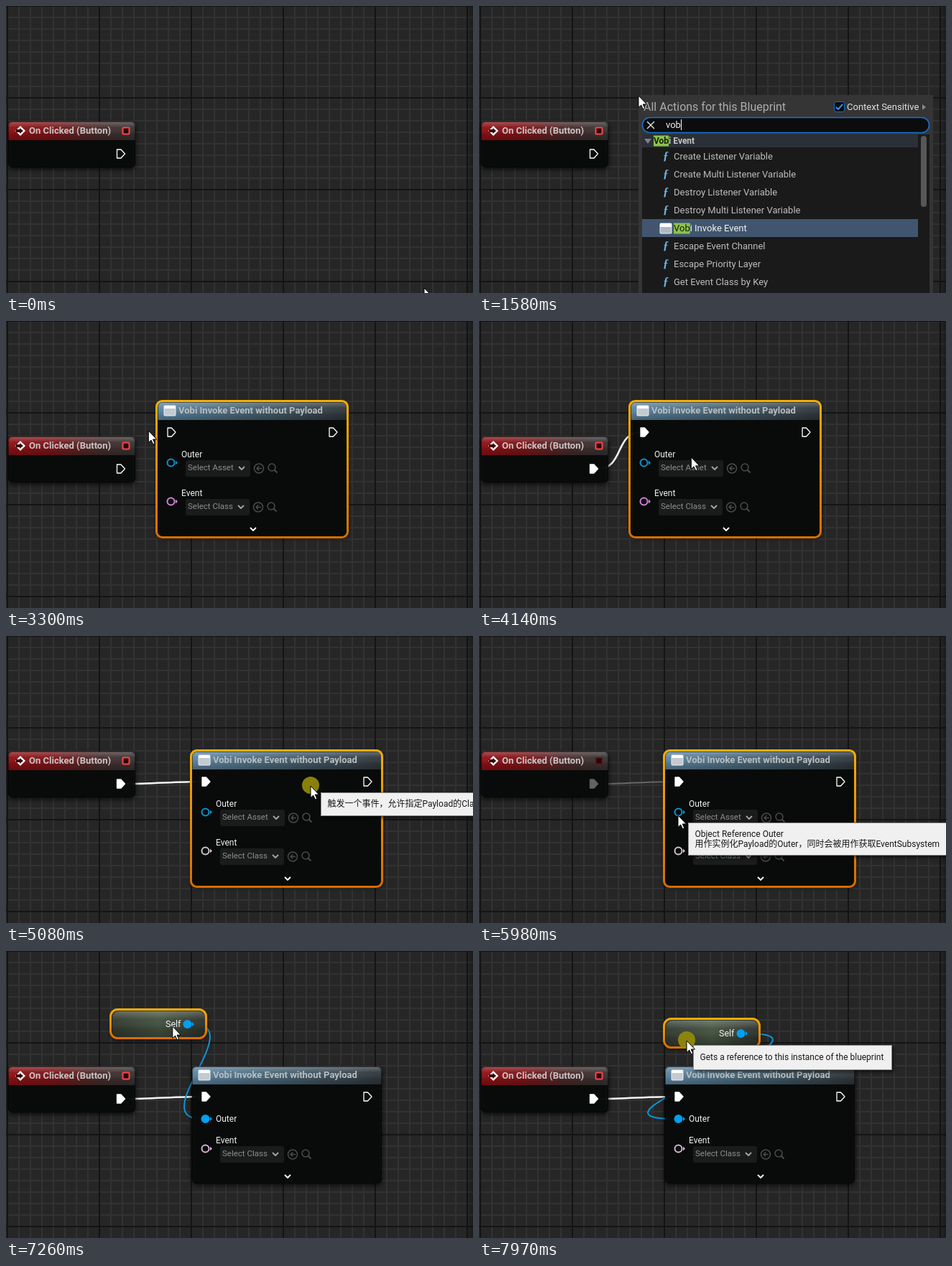
An HTML page with a canvas for the animation above (8000 ms loop, 650 by 400 pixels).

```html
<!DOCTYPE html>
<html lang="en">
<head>
<meta charset="utf-8">
<title>Node graph</title>
<style>
html, body { margin: 0; width: 100%; height: 100%; overflow: hidden; background: #262626; }
canvas { display: block; }
</style>
</head>
<body>
<canvas id="stage" width="650" height="400"></canvas>
<script>
const c = document.getElementById('stage').getContext('2d');
const LOOP = 8000;
const FONT = 'Roboto, "Noto Sans CJK SC", "Noto Sans CJK", sans-serif';
const BLUE = '#0c93d6';

// Pointer path: time, x, y
const PATH = [
  [40, 582, 393], [360, 222, 125], [2840, 222, 125], [2960, 236, 98], [3630, 162, 206],
  [3680, 157, 208], [3840, 226, 164], [4010, 226, 164], [4140, 295, 190], [4400, 376, 155],
  [4450, 376, 155], [4780, 423, 213], [5030, 423, 213], [5080, 424, 209], [5240, 424, 209],
  [5500, 350, 130], [5800, 277, 250], [6060, 277, 250], [6400, 264, 101], [7150, 264, 101],
  [7450, 177, 112], [7550, 177, 112], [7720, 228, 112], [7860, 289, 125]
];
const PRESSES = [[360, 530], [3680, 4010], [4450, 5240], [6060, 6400], [7550, 8000]];
const CATEGORIES = ['Add Event', 'Animation', 'Audio', 'Camera', 'Collision', 'Components',
  'Development', 'Game', 'Input', 'Math', 'Rendering'];
const ACTIONS = ['Create Listener Variable', 'Create Multi Listener Variable',
  'Destroy Listener Variable', 'Destroy Multi Listener Variable', 'Vobi Invoke Event',
  'Escape Event Channel', 'Escape Priority Layer', 'Get Event Class by Key'];
const CASTS = ['PolyvuntaCommonTessellationOptions', 'EditorUtilityInputKeySelector',
  'InputKeySelector', 'InterchangeBaseLightFactoryNode', 'InterchangeBaseLightNode',
  'MaterialExpressionInverseLinearInterpolate', 'TavundaBaselineController',
  'TavundaBaselineController_Basic', 'TavundaPerfBaselineActor'].map(s => 'Cast To ' + s);

const within = (t, a, b) => t >= a && t < b;
const snap = v => Math.round(v / 16) * 16;

function pointerAt(t) {
  let a = PATH[0];
  if (t <= a[0]) return { x: a[1], y: a[2] };
  for (const b of PATH) {
    if (t < b[0]) {
      const k = (t - a[0]) / (b[0] - a[0]);
      return { x: a[1] + (b[1] - a[1]) * k, y: a[2] + (b[2] - a[2]) * k };
    }
    a = b;
  }
  return { x: a[1], y: a[2] };
}

function typed(t, steps) {
  let s = '';
  for (const [at, value] of steps) if (t >= at) s = value;
  return s;
}

// Drawing helpers
function text(s, x, y, size, color, weight = 400) {
  c.font = `${weight} ${size}px ${FONT}`;
  c.textBaseline = 'middle';
  c.fillStyle = color;
  c.fillText(s, x, y);
  return c.measureText(s).width;
}
function rect(x, y, w, h, color) {
  c.fillStyle = color;
  c.fillRect(x, y, w, h);
}
function round(x, y, w, h, r, fill, stroke, width = 1) {
  c.beginPath();
  c.roundRect(x, y, w, h, r);
  if (fill) { c.fillStyle = fill; c.fill(); }
  if (stroke) { c.strokeStyle = stroke; c.lineWidth = width; c.stroke(); }
}
function poly(x, y, pts, fill, stroke, width = 1.5) {
  c.beginPath();
  for (let i = 0; i < pts.length; i += 2) c.lineTo(x + pts[i], y + pts[i + 1]);
  if (fill) { c.closePath(); c.fillStyle = fill; c.fill(); }
  if (stroke) { c.lineJoin = 'round'; c.strokeStyle = stroke; c.lineWidth = width; c.stroke(); }
}
function ring(x, y, r, fill, stroke, width = 1.5) {
  c.beginPath();
  c.arc(x, y, r, 0, 7);
  if (fill) { c.fillStyle = fill; c.fill(); }
  if (stroke) { c.strokeStyle = stroke; c.lineWidth = width; c.stroke(); }
}
function ramp(x0, y0, x1, y1, ...colors) {
  const g = c.createLinearGradient(x0, y0, x1, y1);
  colors.forEach((k, i) => g.addColorStop(i / (colors.length - 1), k));
  return g;
}

function grid() {
  rect(0, 0, 650, 400, '#262626');
  for (let x = 2; x < 650; x += 16) rect(x - 1, 0, 2, 400, '#323232');
  for (let y = 0; y < 400; y += 16) rect(0, y - 1, 650, 2, '#323232');
  for (let x = 2; x < 650; x += 128) rect(x - 1, 0, 2, 400, '#141414');
  for (let y = 0; y < 400; y += 128) rect(0, y - 1, 650, 2, '#141414');
  rect(640, 0, 10, 400, ramp(640, 0, 650, 0, 'rgba(0,0,0,0)', 'rgba(0,0,0,.3)'));
}

function wire(x0, y0, x1, y1, color, width) {
  const dx = x1 - x0, dy = Math.abs(y1 - y0);
  const k = dx < 20 ? Math.abs(dx) + dy / 2 : (dx + dy) / 3;
  c.beginPath();
  c.moveTo(x0, y0);
  c.bezierCurveTo(x0 + k, y0, x1 - k, y1, x1, y1);
  c.strokeStyle = color;
  c.lineWidth = width;
  c.stroke();
}

function execPin(x, y, full, color = '#fff') {
  poly(x, y, [-5, -6, 0.5, -6, 6, 0, 0.5, 6, -5, 6, -5, -6], full ? color : '#0b0d0c', color, 1.3);
}
function dataPin(x, y, color, full) {
  ring(x, y, 5, full ? color : '#0a0c0b', color, 2);
  poly(x, y, [6.5, -3, 9.5, 0, 6.5, 3], color);
}
const chevron = (x, y, color) => poly(x, y, [-4, -2, 0, 2, 4, -2], null, color, 1.8);

function box(x, y, w, h, r, hue, headH) {
  c.save();
  c.shadowColor = '#000';
  c.shadowBlur = 7;
  c.shadowOffsetY = 2;
  round(x, y, w, h, r, 'rgba(9,12,10,.85)');
  c.restore();
  c.save();
  c.beginPath();
  c.roundRect(x, y, w, h, r);
  c.clip();
  rect(x, y, w, headH, ramp(x, y, x + w, y, ...hue));
  rect(x, y, w, headH, ramp(x, y, x, y + headH, 'rgba(255,255,255,.28)',
    'rgba(255,255,255,.04)', 'rgba(0,0,0,.1)', 'rgba(0,0,0,.25)'));
  c.restore();
  round(x + .5, y + .5, w - 1, h - 1, r, null, 'rgba(0,0,0,.5)');
}
function outline(x, y, w, h, r) {
  round(x + 1.5, y + 1.5, w - 3, h - 3, r, null, ramp(0, y, 0, y + h, '#f7ae00', '#d76c00'), 3);
}

function clickNode(linked, dim) {
  box(3, 161, 177, 64, 6, ['#8f1015', '#7c1418', '#4a2a2a', '#343434'], 26);
  poly(20, 174, [-7, 0, 0, -7, 7, 0, 0, 7, -7, 0], '#fff');
  poly(20, 174, [-6, -2, -1, -2, -1, -4, 4, 0, -1, 4, -1, 2, -6, 2], '#35090b');
  text('On Clicked (Button)', 32, 174, 13, '#c9c4c4', 700);
  round(162.5, 169.5, 9, 9, 1, '#2a0506', dim ? '#5e1a1c' : '#ff4648', 2);
  execPin(159.5, 206, linked, dim ? '#626262' : '#fff');
}

function picker(x, y, label, w) {
  round(x + 42, y, w, 23, 3, '#1a1c1b');
  text(label, x + 45, y + 11, 11.5, '#8d8d8d');
  chevron(x + 42 + w - 12, y + 11, '#a5a5a5');
  const ix = x + 54 + w;
  ring(ix, y + 11.5, 6.5, null, '#4b4b4b');
  poly(ix, y + 11.5, [4, 0, -3, 0, 0, -3, -3, 0, 0, 3], null, '#4b4b4b');
  ring(ix + 18, y + 10, 5, null, '#4b4b4b');
  poly(ix + 21.5, y + 13.5, [0, 0, 4, 4], null, '#4b4b4b', 2);
}

function invokeNode(x, y, o) {
  const up = o.outer ? 24 : 0;
  box(x + 3, y + 3, 264, 187 - up, 6, o.fresh ? ['#686868', '#4c4c4c', '#303030']
    : ['#5d86a4', '#45606f', '#30363a'], 25);
  if (o.selected) outline(x, y, 269, 193, 8);
  round(x + 12, y + 8, 16, 14, 1, '#c3cad0');
  rect(x + 12, y + 8, 16, 4, '#fff');
  round(x + 12, y + 8, 16, 14, 1, null, '#eee');
  text('Vobi Invoke Event without Payload', x + 32, y + 15, 13, '#b8bdc0', 700);
  execPin(x + 22, y + 45, o.linked);
  execPin(x + 247, y + 45);
  text('Outer', x + 36, y + 76, 12, '#f0f0f0');
  dataPin(x + 21.5, y + (o.outer ? 76 : 87.5), o.outer ? '#00a0f0' : BLUE, o.outer);
  if (!o.outer) picker(x, y + 84, 'Select Asset', 90);
  text('Event', x + 36, y + 130 - up, 12, '#f0f0f0');
  dataPin(x + 21.5, y + 141.5 - up, o.pin);
  picker(x, y + 138 - up, 'Select Class', 89);
  chevron(x + 136, y + 180 - up, '#fff');
}

function selfNode(x, y) {
  box(x + 2, y + 2, 131, 38, 10, ['#32382f', '#42523f', '#2c302b'], 38);
  outline(x - 1, y - 1, 136, 43, 10);
  text('Self', x + 77, y + 21, 12.5, '#f2f2f2');
  dataPin(x + 107.5, y + 21, '#00a0f0', true);
}

// Text with the searched words marked
function marked(s, x, y, size, color, query, weight) {
  const words = query.trim().split(' ').join('|');
  const parts = words ? s.split(new RegExp(`(${words})`, 'i')) : [s];
  c.font = `${weight || 400} ${size}px ${FONT}`;
  parts.forEach((p, i) => {
    const w = c.measureText(p).width;
    if (i % 2) rect(x, y - 7.5, w, 15, '#8bc34a');
    text(p, x, y, size, i % 2 ? '#14200a' : color, weight);
    x += w;
  });
}

function rowIcon(kind, x, y) {
  if (kind == 'window') {
    round(x - 8, y - 7, 16, 14, 1, '#aeb9c4', '#eee');
    rect(x - 8, y - 7, 16, 5, '#fff');
  } else if (kind == 'cast') {
    poly(x - 1, y, [-8, -4, -4, 0, -8, 4], '#fff');
    rect(x - 4, y - 1.5, 2, 3, '#fff');
    rect(x - 1, y - 1.5, 5, 3, '#fff');
    poly(x + 1, y, [2, -4, 7, 0, 2, 4], '#fff');
  } else {
    c.font = 'italic 700 16px "Liberation Serif", serif';
    c.fillStyle = '#6cb4e6';
    c.fillText('ƒ', x - 4, y);
  }
}

function menu(x, y, m) {
  rect(x, y, 410, 400, '#353535');
  if (m.title) text(m.title, x + 7, m.titleY, 16, '#adadad');
  else ring(x + 12, m.titleY, 5, '#00a0f0');
  round(x + 272.5, m.titleY - 7.5, 14, 14, 3, '#0c0c0c', '#1770d2');
  poly(x + 279, m.titleY, [-4, 0, -1, 3, 5, -4], null, '#2a93ff', 2);
  text('Context Sensitive', x + 290, m.titleY, 13, '#e0e0e0');
  poly(x + 398, m.titleY, [-3, -4, 2, 0, -3, 4], '#8a8a8a');

  const sy = m.searchY;
  round(x + 5.5, sy - 10.5, 399, 21, 10.5, '#0c0c0c', '#1672d6', 1.5);
  let caretX = x + 33;
  if (m.query) {
    poly(x + 17, sy, [-5, -5, 5, 5], null, '#ddd');
    poly(x + 17, sy, [5, -5, -5, 5], null, '#ddd');
    caretX = x + 38 + text(m.query, x + 38, sy, 13, '#f0f0f0');
  } else {
    ring(x + 16, sy - 1, 4, null, '#aaa');
    poly(x + 19, sy + 2, [0, 0, 4, 4], null, '#aaa');
  }
  if (m.caret) rect(Math.round(caretX), sy - 8, 1, 15, '#fff');

  c.save();
  c.beginPath();
  c.rect(x + 5, m.listY, 400, 400);
  c.clip();
  rect(x + 5, m.listY, 400, 400, '#1a1a1a');
  const long = !m.query || m.rows.length > 1;
  const rowW = long ? 384 : 400;
  const header = (s, cy, open) => {
    rect(x + 5, cy - 9, rowW, 18, '#2b3038');
    poly(x + 13, cy, open ? [-5, -3, 5, -3, 0, 4] : [-3, -5, 4, 0, -3, 5], '#808080');
    marked(s, x + 21, cy, 12, '#c4c4c4', m.query, 700);
  };
  if (!m.query) {
    CATEGORIES.forEach((s, i) => header(s, m.listY + 9 + i * 20));
  } else {
    if (m.category) header(m.category, m.listY + 9, true);
    m.rows.forEach((s, i) => {
      const cy = m.rowY + 25 * i, on = s == m.pick;
      if (on) rect(x + 5, cy - 13, rowW, 25, '#41566e');
      rowIcon(m.icon || (on ? m.pickIcon : ''), x + (m.icon ? 48 : 38), cy);
      marked(s, x + m.indent, cy, 13, on ? '#f0f0f0' : '#bdbdbd', m.query);
    });
  }
  if (long) round(x + 393, m.listY + 2, 8, 99, 4, '#575757');
  c.restore();
}

function tooltip(x, y, w, h, lines) {
  c.save();
  c.shadowColor = 'rgba(0,0,0,.7)';
  c.shadowBlur = 5;
  c.shadowOffsetX = c.shadowOffsetY = 2;
  rect(x, y, w, h, '#f0f0f0');
  c.restore();
  c.strokeStyle = '#8c8c8c';
  c.lineWidth = 1;
  c.strokeRect(x + .5, y + .5, w - 1, h - 1);
  lines.forEach((s, i) => text(s, x + 9.5, y + h / 2 + (i - (lines.length - 1) / 2) * 14, 12, '#181818'));
}
const hint = (x, y) => tooltip(x, y, 270, 33, ['触发一个事件，允许指定Payload的Class']);

function arrow(x, y) {
  poly(x, y, [0, 0, 0, 16.5, 3.7, 13, 6.4, 18.8, 8.8, 17.7, 6.2, 12, 11.5, 12, 0, 0], '#fff', '#000', 1);
}
function moveCursor(x, y) {
  const arm = [1, -1, 1, -6, 4, -6, 0, -10, -4, -6, -1, -6, -1, -1];
  const pts = [];
  for (let k = 0; k < 4; k++) {
    for (let i = 12; i >= 0; i -= 2) {
      let px = arm[i], py = arm[i + 1];
      for (let n = 0; n < k; n++) [px, py] = [-py, px];
      pts.push(px, py);
    }
  }
  poly(x, y, pts.concat(pts.slice(0, 2)), '#fff', '#000', 1);
}

function draw(t) {
  const p = pointerAt(t);
  const linked = t >= 4010;
  const dim = within(t, 5800, 7000);
  const outer = t >= 7000;

  let nx = 208, ny = 110;
  if (t >= 4450) {
    const q = t < 5240 ? p : pointerAt(5240);
    nx += snap(q.x - 376);
    ny += snap(q.y - 155);
  }
  let sx = 145, sy = 81;
  if (t >= 7550) {
    sx += snap(p.x - 177);
    sy += p.y > 119 ? 13 : 0;
  }

  grid();
  if (linked) wire(165, 206, nx + 18, ny + 45, dim ? '#676767' : '#f4f4f4', dim ? 2 : 2.6);
  else if (t >= 3680) wire(165, 206, p.x, p.y, '#f4f4f4', 2.6);
  if (within(t, 6060, 7000)) wire(p.x, p.y, nx + 16, ny + 87.5, '#8ac8f6', 5);
  if (outer) wire(sx + 115, sy + 21, nx + 16, ny + 76, BLUE, 2);

  clickNode(linked, dim);
  if (t >= 2590) {
    invokeNode(nx, ny, {
      linked, outer, selected: !outer, fresh: t < 2840,
      pin: within(t, 2840, 5000) ? '#d283d8' : outer ? '#d8b0d4' : '#cfc4cf'
    });
  }
  if (outer) selfNode(sx, sy);

  if (within(t, 530, 2590)) {
    const query = typed(t, [[1380, 'v'], [1480, 'vo'], [1580, 'vob'], [1660, 'vobi'],
      [2130, 'vobi i'], [2230, 'vobi in'], [2340, 'vobi inv']]);
    menu(222, 124, {
      title: 'All Actions for this Blueprint', titleY: 141, searchY: 166, listY: 179, rowY: 210,
      query, caret: !within(t, 1080, 1380) && !within(t, 1930, 2130), category: 'Vobi Event',
      rows: t < 2130 ? ACTIONS : [ACTIONS[4]], pick: ACTIONS[4], pickIcon: 'window', indent: 49
    });
  }
  if (within(t, 6440, 7000)) {
    const found = 'Get a reference to self', done = t >= 6880;
    menu(259, 102, {
      titleY: 129, searchY: 163, listY: 176, rowY: done ? 190 : 185, indent: 59, caret: true,
      query: typed(t, [[6560, 's'], [6640, 'se'], [6720, 'sel'], [6880, 'self']]),
      rows: done ? [found] : CASTS, icon: done ? '' : 'cast', pick: found
    });
  }

  if (within(t, 2840, 2960)) hint(p.x + 14, p.y + 9);
  if (within(t, 4400, 5240)) hint(p.x + 14, p.y + 9);
  if (within(t, 5900, 7000)) {
    tooltip(p.x + 14, p.y + 10, 362, 46,
      ['Object Reference Outer', '用作实例化Payload的Outer，同时会被用作获取EventSubsystem']);
  }
  if (t >= 7500) {
    tooltip(p.x + 9, p.y + 6, 277, 35, ['Gets a reference to this instance of the blueprint']);
  }

  if (PRESSES.some(([a, b]) => within(t, a, b))) ring(p.x, p.y - 1, 12, 'rgba(148,139,10,.92)');
  if (within(t, 2590, 2840)) moveCursor(p.x, p.y - 1);
  else arrow(p.x, p.y);
}

const start = performance.now();
function frame() {
  draw((performance.now() - start) % LOOP);
  requestAnimationFrame(frame);
}
frame();
</script>
</body>
</html>
```
